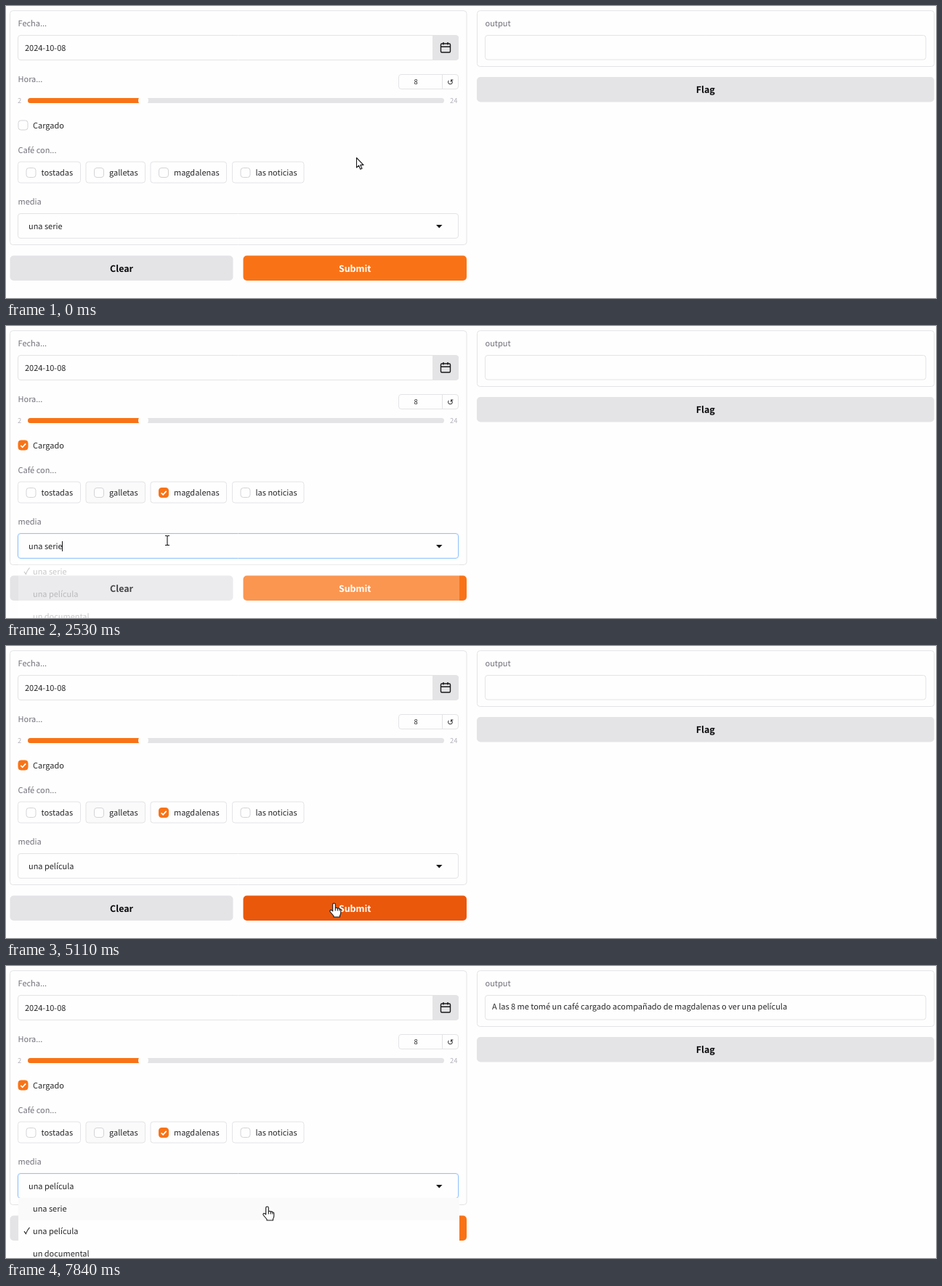
Animation, 1280 px wide and 403 px high, one loop 7990 ms. Source, as an HTML page with a canvas:

```html
<!DOCTYPE html>
<html lang="es">
<head>
<meta charset="utf-8">
<title>Formulario</title>
<style>
html, body { margin: 0; width: 100%; height: 100%; overflow: hidden; background: #fefefe; }
canvas { display: block; width: 1280px; height: 403px; }
</style>
</head>
<body>
<canvas id="stage" width="1280" height="403"></canvas>
<script>
const LOOP = 7990;
const ctx = document.getElementById('stage').getContext('2d');
const FAMILY = '"Noto Sans CJK JP", "Noto Sans CJK SC", "Noto Sans CJK", "Noto Sans", sans-serif';
const BODY = 10.97, SMALL = 9.4, BUTTON = 12.45;
const PAGE = '#fefefe', LINE = '#e4e4e7', ORANGE = '#f97316', DARK_ORANGE = '#ea580c';
const INK = '#27272a', MUTED = '#71717a', PALE = '#b4b4bb', HOVER = '#fafafa';

const CHIPS = [
  { label: 'tostadas', x: 16.5, w: 86 },
  { label: 'galletas', x: 110, w: 81.5 },
  { label: 'magdalenas', x: 199, w: 104.5 },
  { label: 'las noticias', x: 311.5, w: 98.5 }
];
const OPTIONS = ['una serie', 'una película', 'un documental'];

// Pointer: time, x, y, shape
const POINTER = [
  [0, 482, 209, 'arrow'], [120, 468, 211, 'arrow'], [270, 400, 217, 'hand'],
  [390, 285, 221, 'hand'], [510, 170, 218, 'hand'], [660, 88, 197, 'arrow'],
  [780, 46, 175, 'hand'], [930, 29, 164, 'hand'], [1050, 25, 161, 'hand'],
  [1440, 58, 184, 'arrow'], [1590, 150, 214, 'hand'], [1740, 219.5, 222, 'hand'],
  [2010, 222, 256, 'arrow'], [2130, 222, 296, 'beam'],
  [2800, 222, 302, 'beam'], [2950, 220, 313, 'beam'], [3070, 217, 326, 'hand'],
  [3220, 215, 334, 'hand'], [3370, 214, 338, 'hand'], [3680, 213, 340, 'hand'],
  [3800, 209, 348, 'hand'], [3920, 202, 355, 'hand'], [4070, 193, 358, 'hand'],
  [4220, 188, 359, 'hand'], [4810, 240, 365, 'hand'], [4960, 362, 368, 'hand'],
  [5110, 451.5, 355, 'hand'], [6910, 433.5, 345.5, 'hand'], [7030, 424, 322, 'arrow'],
  [7180, 415, 306, 'beam'], [7720, 388, 325, 'hand'], [7840, 359.5, 332, 'hand']
];

// Dropdown opacity and result opacity change in steps
const MENU = [[0, 0], [2530, .25], [2650, 1], [4220, .4], [4370, 0], [7300, .25], [7450, 1]];
const RESULT = [[0, 0], [5510, .3], [5630, .7], [5780, 1]];

const keyAt = (keys, t) => keys.reduce((found, key) => key[0] <= t ? key : found);
const between = (t, a, b) => t >= a && t < b;

function box(x, y, w, h, r, fill, stroke) {
  ctx.beginPath();
  ctx.roundRect(x, y, w, h, r);
  if (fill) { ctx.fillStyle = fill; ctx.fill(); }
  if (stroke) { ctx.strokeStyle = stroke; ctx.lineWidth = 1; ctx.stroke(); }
}

function text(str, x, y, color = INK, size = BODY, align = 'left', weight = 400) {
  ctx.font = `${weight} ${size}px ${FAMILY}`;
  ctx.textAlign = align;
  ctx.fillStyle = color;
  ctx.fillText(str, x, y);
}

function trace(d, color, width) {
  ctx.strokeStyle = color;
  ctx.lineWidth = width;
  ctx.stroke(new Path2D(d));
}

function button(label, x, y, w, h, fill, color) {
  box(x, y, w, h, 5, fill);
  text(label, x + w / 2, y + h / 2 + 5, color, BUTTON, 'center', 600);
}

function checkbox(x, y, on) {
  box(x, y, 13, 13, 3.5, on ? ORANGE : PAGE, on ? ORANGE : '#d4d4d8');
  if (on) trace(`M${x + 3.2} ${y + 6.8}l2.5 2.5l4.5-5`, '#fff', 1.8);
}

function dateField() {
  text('Fecha...', 16.5, 28, MUTED);
  box(587, 40.5, 36, 34, [0, 3.5, 3.5, 0], LINE);
  box(16.5, 40.5, 606, 34, 3.5, null, LINE);
  text('2024-10-08', 26, 62);
  box(598.5, 52, 13, 12, 1.5);
  ctx.strokeStyle = '#18181b';
  ctx.lineWidth = 1.4;
  ctx.stroke();
  trace('M598.5 56.2h13M602 50v3.6M608 50v3.6', '#18181b', 1.4);
}

function hourField() {
  text('Hora...', 16.5, 105, MUTED);
  box(540.5, 94.5, 82, 20, 3.5, PAGE, LINE);
  trace('M600.5 95v19', LINE, 1);
  text('8', 564, 108, INK, SMALL, 'center');
  ctx.font = '11px "DejaVu Sans", sans-serif';
  ctx.fillText('↺', 611.5, 109);
  text('2', 16, 134, PALE, SMALL);
  text('24', 611, 134, PALE, SMALL);
  box(30, 127, 573, 7, 3.5, LINE);
  box(30, 127, 159, 7, [3.5, 0, 0, 3.5], ORANGE);
  box(182, 123.5, 14, 14, 7, PAGE);
}

function checks(t) {
  checkbox(17, 158, t >= 1170);
  text('Cargado', 37, 169);
  text('Café con...', 16.5, 203, MUTED);
  CHIPS.forEach(({ label, x, w }, i) => {
    const shaded = i === 1 && t >= 1590 || i === 2 && between(t, 1740, 2010);
    box(x, 215, w, 29, 3.5, shaded ? HOVER : PAGE, LINE);
    checkbox(x + 11.5, 223.5, i === 2 && t >= 1890);
    text(label, x + 32, 234);
  });
}

function select(t) {
  const focus = between(t, 2530, 4220) || t >= 7180;
  const caret = between(t, 2530, 3070) || between(t, 3680, 4070) || between(t, 7180, 7720);
  const picked = t >= 4220 ? 1 : 0;
  text('media', 16.5, 274, MUTED);
  if (focus) box(15.5, 285.5, 608, 36, 4.5, null, '#eef5fd');
  box(16.5, 286.5, 606, 34, 3.5, PAGE, focus ? '#93c5fd' : LINE);
  text(OPTIONS[picked], 31, 308);
  if (caret) trace(`M${picked ? 93.5 : 77.5} 297v14`, '#18181b', 1);
  ctx.fillStyle = '#18181b';
  ctx.fill(new Path2D('M592 302h8.5l-4.25 4.5z'));
}

function menu(t) {
  const alpha = keyAt(MENU, t)[1];
  if (!alpha) return;
  const checked = t >= 4220 ? 1 : 0;
  const hovered = between(t, 3070, 3800) || t >= 7720 ? 0 : between(t, 3800, 4370) ? 1 : -1;
  ctx.save();
  ctx.globalAlpha = alpha;
  ctx.translate(0, alpha < 1 ? 3.5 : 0);
  box(17, 320, 607, 100, 0, PAGE);
  OPTIONS.forEach((label, i) => {
    const top = 320 + i * 30.6;
    if (i === hovered) box(17, top, 607, 30.6, 0, HOVER);
    if (i === checked) trace(`M25 ${top + 15.5}l2.3 3.5q2-5.5 5.2-8.8`, INK, 1.1);
    text(label, 37, Math.round(top + 19.3));
  });
  ctx.restore();
}

function output(t) {
  box(648.5, 6.5, 629, 77, 4, PAGE, LINE);
  text('output', 659.5, 28, MUTED);
  box(659.5, 40.5, 606.5, 33.5, 3.5, PAGE, LINE);
  ctx.globalAlpha = keyAt(RESULT, t)[1];
  text('A las 8 me tomé un café cargado acompañado de magdalenas o ver una película', 669, 60);
  ctx.globalAlpha = 1;
  button('Flag', 648, 98, 629.5, 34.5, LINE, '#09090b');
}

const SHAPES = {
  arrow: new Path2D('M.5.5V14L3.6 11.2L5.8 16.2L8 15.2L5.8 10.4H10Z'),
  hand: new Path2D('M-1.8 11V1.8A1.8 1.8 0 0 1 1.8 1.8V7Q3.5 5.5 4.8 7.2Q6.6 6.2 7.4 8Q9.3 7.6 9.3 9.5V13' +
    'Q9.3 15.5 8 17V19H-.5V17.5L-5.2 12Q-6.2 10 -4.7 9.4Q-3.4 9.2 -1.8 11ZM1.8 7V10.5M4.8 7.4V10.5M7.4 8.2V10.5'),
  beam: new Path2D('M-3-6.5H-1Q0-6.5 0-5.5Q0-6.5 1-6.5H3M0-5.5V5.5M-3 6.5H-1Q0 6.5 0 5.5Q0 6.5 1 6.5H3')
};

function pointer(t) {
  const [, x, y, kind] = keyAt(POINTER, t);
  ctx.save();
  ctx.translate(x, y);
  if (kind !== 'beam') {
    ctx.fillStyle = '#fff';
    ctx.fill(SHAPES[kind]);
  }
  ctx.strokeStyle = '#18181b';
  ctx.lineWidth = 1.1;
  ctx.lineJoin = 'round';
  ctx.stroke(SHAPES[kind]);
  ctx.restore();
}

function draw(t) {
  ctx.textBaseline = 'alphabetic';
  ctx.textRendering = 'geometricPrecision';
  ctx.fillStyle = PAGE;
  ctx.fillRect(0, 0, 1280, 403);
  box(5.5, 6.5, 628.5, 323, 4, PAGE, LINE);
  dateField();
  hourField();
  checks(t);
  button('Clear', 5.5, 344.5, 307, 34.5, LINE, '#09090b');
  button('Submit', 326.5, 344.5, 307.5, 34.5, between(t, 4960, 7030) ? DARK_ORANGE : ORANGE, '#fff');
  select(t);
  output(t);
  menu(t);
  pointer(t);
}

const start = performance.now();
function tick() {
  draw((performance.now() - start) % LOOP);
  requestAnimationFrame(tick);
}
tick();
</script>
</body>
</html>
```
